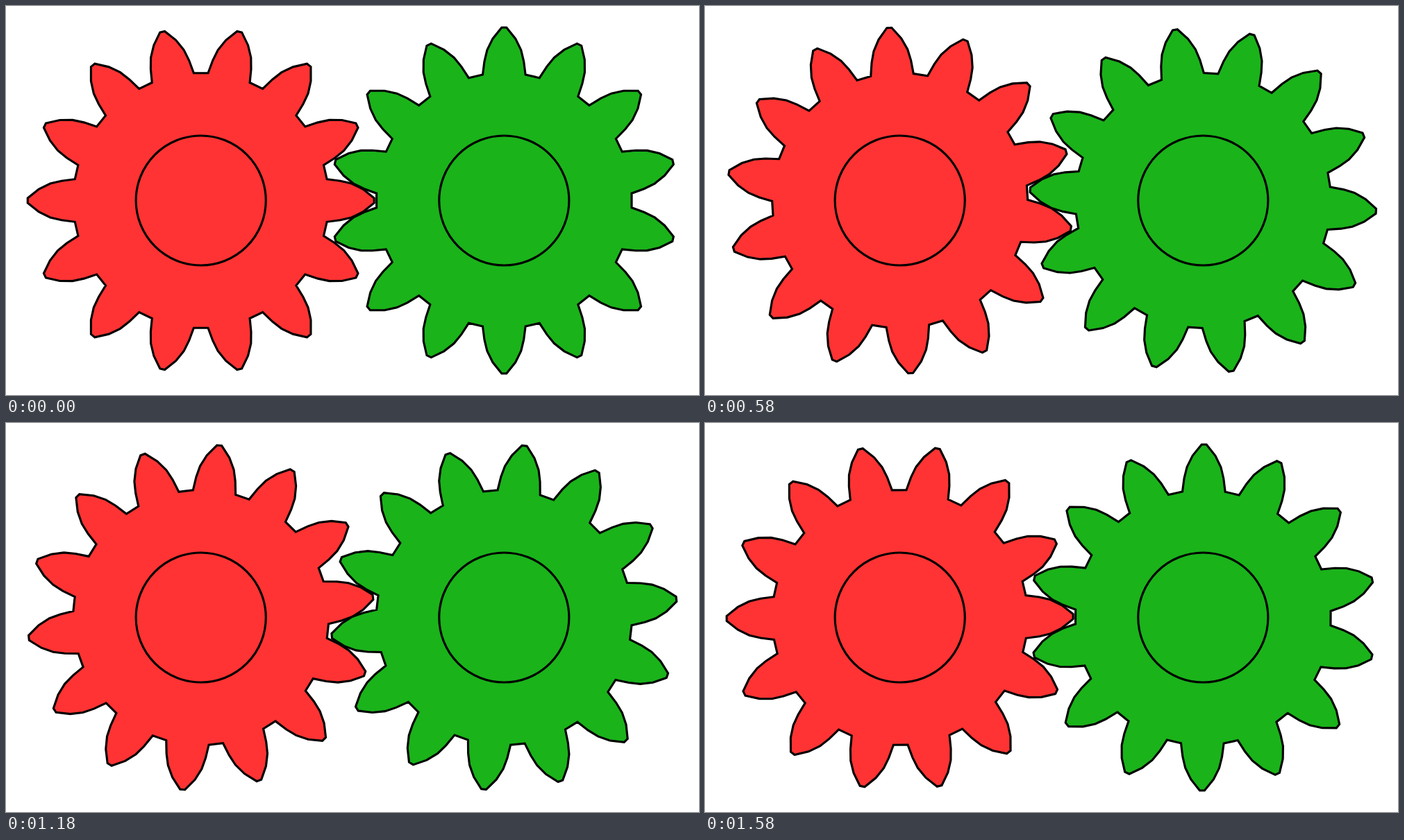
Write an HTML page that moves like this. It is 998 px wide and 561 px high and loops after 1600 ms.

```html
<!DOCTYPE html>
<html lang="en">
<head>
<meta charset="utf-8">
<title>Meshing gears</title>
<style>
  html, body { margin: 0; height: 100%; overflow: hidden; background: #fff; }
  svg { display: block; width: 100vw; height: 100vh; }
  .gear { stroke: #000; stroke-width: .1; }
</style>
</head>
<body>
<svg viewBox="0 0 998 561">
  <g transform="translate(499 280.5) scale(31.1875)">
    <g class="gear" fill="#ff3333" transform="translate(-7 0)"><path/><circle r="3"/></g>
    <g class="gear" fill="#1ab31a" transform="translate(7 0)"><path/><circle r="3"/></g>
  </g>
</svg>
<script>
// Lengths are in gear modules.
const TEETH = 14, PITCH_R = TEETH / 2, PITCH = 360 / TEETH;
const LOOP = 1600, FRAME = 20;

// Tooth flank from root to tip: [height above pitch circle, half width in 1/16 pitch].
const flank = [[-1.1, 6], [-.5, 5], [0, 4], [.5, 2.5], [1, .5]];
const tooth = [...flank.map(([h, w]) => [h, -w]), ...flank.slice().reverse()];

const points = [];
for (let i = 0; i < TEETH; i++) {
  for (const [height, width] of tooth) {
    const r = PITCH_R + height;
    const angle = (i + width / 16) * PITCH * Math.PI / 180;
    points.push(`${(r * Math.cos(angle)).toFixed(4)} ${(r * Math.sin(angle)).toFixed(4)}`);
  }
}

const [left, right] = document.querySelectorAll('path');
for (const path of [left, right]) path.setAttribute('d', `M${points.join('L')}Z`);

function draw() {
  const time = Math.floor(performance.now() % LOOP / FRAME) * FRAME;
  const turn = PITCH * time / LOOP;
  left.setAttribute('transform', `rotate(${turn})`);
  right.setAttribute('transform', `rotate(${PITCH / 2 - turn})`);
  requestAnimationFrame(draw);
}
draw();
</script>
</body>
</html>
```
